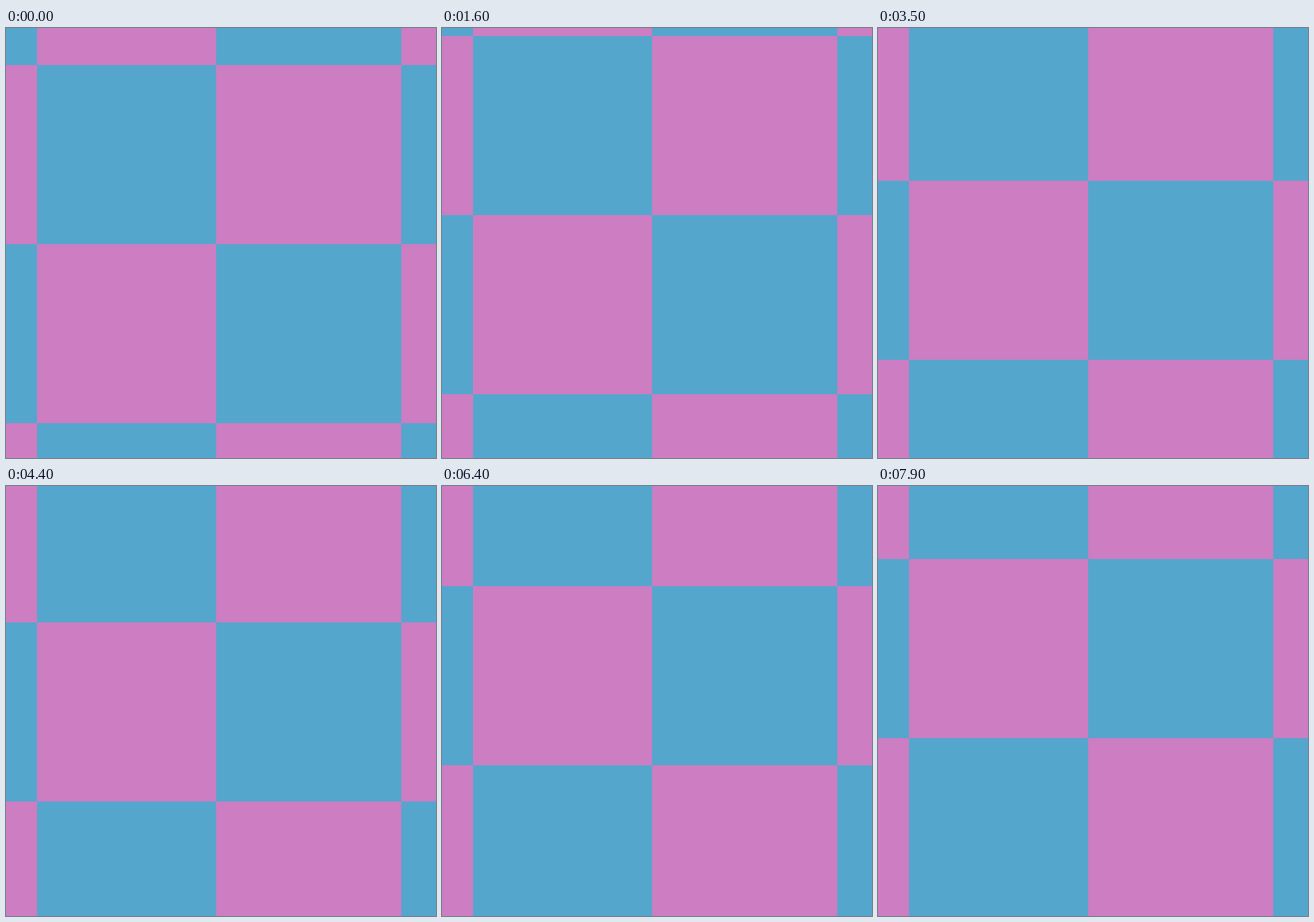
An HTML page for the animation above (8 s loop, 748 by 748 pixels).

```html
<!DOCTYPE html>
<html lang="en">
<head>
<meta charset="utf-8">
<title>Drifting checkerboard</title>
<style>
  html, body { margin: 0; width: 100%; height: 100%; overflow: hidden; background: #cd7dc2; }
  svg { display: block; width: 100%; height: 100%; }
</style>
</head>
<body>
<svg viewBox="0 0 748 748"><path id="board" fill="#54a6cd"/></svg>
<script>
const LOOP = 8000, STEP = 100;
const ROW = 311.5, START_Y = 376, RISE = 3.152;
const COLUMNS = [0, 54, 365.5, 687.6, 748];

const board = document.getElementById('board');
let path = '';
for (let row = -2; row < 2; row++) {
  for (let col = row & 1; col < 4; col += 2) {
    path += `M${COLUMNS[col]} ${row * ROW}H${COLUMNS[col + 1]}v${ROW}H${COLUMNS[col]}z`;
  }
}
board.setAttribute('d', path);

function draw(time) {
  const step = Math.floor((time % LOOP) / STEP);
  board.setAttribute('transform', `translate(0 ${(START_Y - RISE * step).toFixed(2)})`);
}

const begin = performance.now();
function tick() {
  draw(performance.now() - begin);
  requestAnimationFrame(tick);
}
tick();
</script>
</body>
</html>
```
